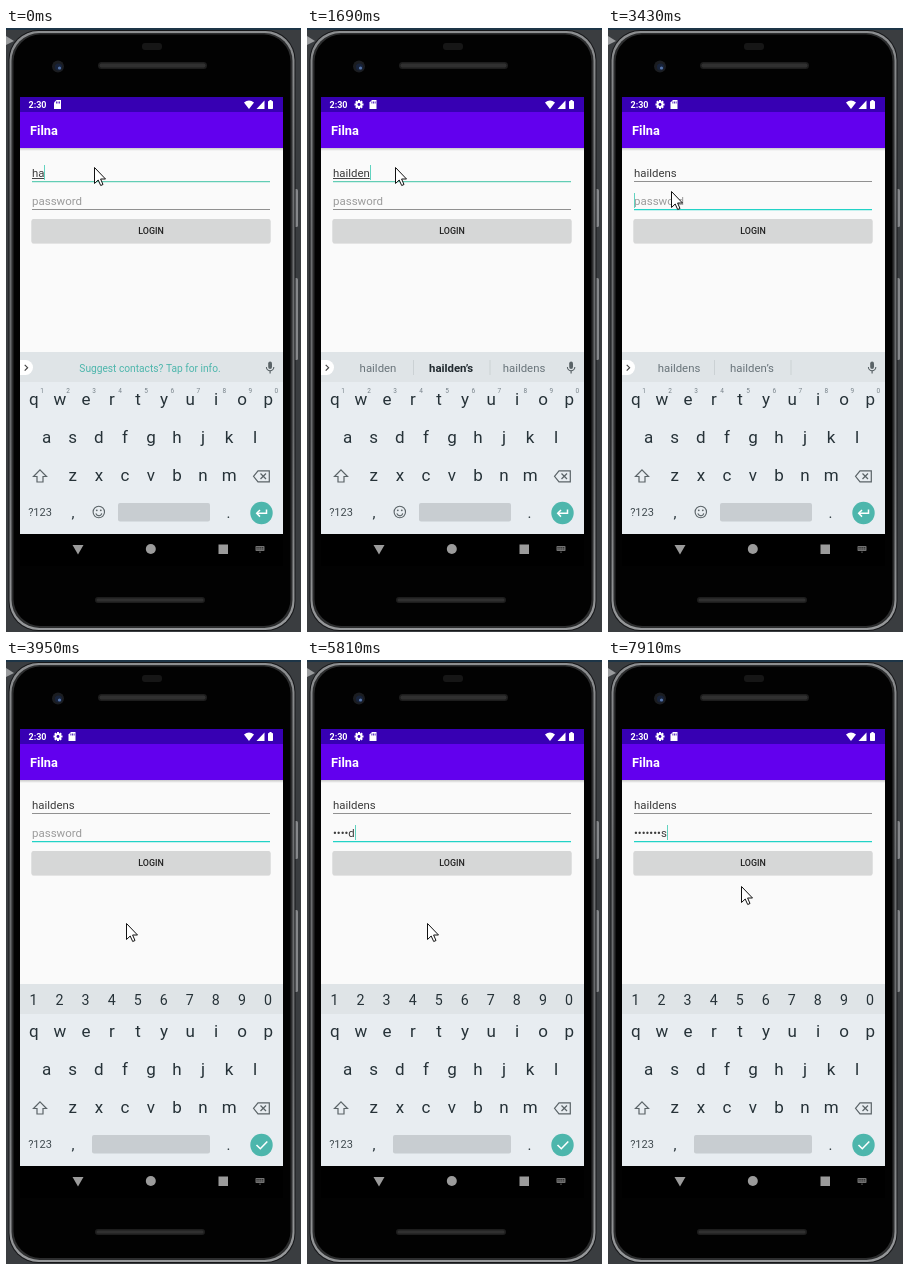
An HTML page with a canvas for the animation above (8 s loop, 295x604 px).

```html
<!DOCTYPE html>
<html lang="en">
<head>
<meta charset="utf-8">
<title>Phone login</title>
<style>
html, body { margin: 0; width: 100%; height: 100%; overflow: hidden; background: #3a3d40; }
canvas { display: block; width: 295px; height: 604px; }
</style>
</head>
<body>
<canvas id="stage"></canvas>
<script>
const W = 295, H = 604, LOOP = 8000;
const canvas = document.getElementById('stage');
const ratio = window.devicePixelRatio || 1;
canvas.width = W * ratio;
canvas.height = H * ratio;
const c = canvas.getContext('2d');
c.scale(ratio, ratio);

const USER = 'haildens', PASS = 'haildens';
const KEY = '#263238', ICON = '#5a6367', TEAL = '#4db6ac';

// Each list holds [start time, value]; a value holds until the next start.
const userLength = [[0, 2], [150, 3], [270, 4], [800, 5], [1180, 6], [1690, 7], [1940, 8]];
const passLength = [[0, 0], [4760, 1], [4910, 2], [5280, 3], [5400, 4], [5810, 5], [6070, 6], [6450, 7], [6970, 8]];
const caretOn = [[0, 1], [2450, 0], [2940, 1], [3810, 0], [4370, 1], [7490, 0], [7910, 1]];
const pointer = [
  [0, [88, 139]], [2570, [77, 150]], [2690, [64, 162]], [2940, [63, 163]],
  [3690, [87, 207]], [3810, [117, 258]], [3950, [120, 263]],
  [7640, [127, 249]], [7790, [131, 234]], [7910, [133, 226]]
];
const hints = [
  [0, null], [270, ['hai', 'hair', 'hail']], [520, ['hail', 'hall', 'halls']],
  [920, ['haild', 'hails', 'halls']], [1430, ['hailde', 'hailden', 'haildens']],
  [1690, ['hailden', 'hailden\u2019s', 'haildens']], [1940, ['haildens', 'hailden\u2019s', '']]
];
const GEAR_AT = 1310, FOCUS_AT = 3310, NUMBERS_AT = 3550;

function at(list, t) {
  let value = list[0][1];
  for (const [start, v] of list) if (t >= start) value = v;
  return value;
}

function rect(x, y, w, h, color) {
  c.fillStyle = color;
  c.fillRect(x, y, w, h);
}

function round(x, y, w, h, r, color) {
  c.fillStyle = color;
  c.beginPath();
  c.roundRect(x, y, w, h, r);
  c.fill();
}

function disc(x, y, r, color) {
  c.fillStyle = color;
  c.beginPath();
  c.arc(x, y, r, 0, Math.PI * 2);
  c.fill();
}

function path(points, closed) {
  c.beginPath();
  points.forEach(([x, y]) => c.lineTo(x, y));
  if (closed) c.closePath();
}

function shape(points, color) {
  path(points, true);
  c.fillStyle = color;
  c.fill();
}

function line(points, color, width, closed) {
  path(points, closed);
  c.strokeStyle = color;
  c.lineWidth = width;
  c.stroke();
}

function text(str, x, y, size, color, align = 'left', weight = 400) {
  c.font = `${weight} ${size}px Roboto, sans-serif`;
  c.textAlign = align;
  c.fillStyle = color;
  c.fillText(str, x, y);
  return c.measureText(str).width;
}

function verticalFade(y1, y2, ...colors) {
  const fade = c.createLinearGradient(0, y1, 0, y2);
  colors.forEach((color, i) => fade.addColorStop(i / (colors.length - 1), color));
  return fade;
}

function drawPhone() {
  rect(0, 0, W, H, '#3a3d40');
  rect(0, 0, W, 2, '#1d3547');
  shape([[0, 8], [8, 13], [0, 17]], '#9a9c9e');
  round(287, 161, 5, 38, 1.5, '#85878a');
  round(287, 250, 5, 82, 1.5, '#85878a');
  round(2.5, 2, 287, 601, 30, '#17181a');
  round(3.5, 3, 285, 599, 29, verticalFade(3, 602, '#8d8f91', '#6b6d6f', '#6b6d6f', '#97999b'));
  round(5.5, 5, 281, 595, 28, '#2c2d2e');
  round(7.5, 6.5, 277, 591.5, 27, '#020202');
  round(136, 15, 20, 7, 3, '#161616');
  drawSpeaker(92, 34, 109, 7);
  drawSpeaker(89, 569, 110, 6);
  disc(52, 38.5, 6, '#1b1d21');
  disc(52.5, 39, 3.6, '#18233a');
  disc(53.5, 40, 1.6, '#5573a8');
}

function drawSpeaker(x, y, w, h) {
  round(x, y, w, h, h / 2, '#1d1d1d');
  round(x + 1.5, y + 1.5, w - 3, h - 3, h / 2 - 1.5, '#303030');
}

function drawCard(x) {
  shape([[x + 2.5, 72], [x + 7, 72], [x + 7, 81], [x, 81], [x, 74.5]], '#fff');
  for (let i = 0; i < 3; i++) rect(x + 2 + i * 1.6, 73.5, 0.8, 2, '#3700b3');
}

function drawGear(x, y) {
  for (let i = 0; i < 8; i++) {
    c.save();
    c.translate(x, y);
    c.rotate(i * Math.PI / 4);
    rect(-1, -4.5, 2, 3, '#fff');
    c.restore();
  }
  disc(x, y, 3.3, '#fff');
  disc(x, y, 1.4, '#3700b3');
}

function drawBars(t) {
  rect(14, 69, 263, 437, '#fafafa');
  rect(14, 69, 263, 15, '#3700b3');
  rect(14, 84, 263, 36, '#6200ee');
  rect(14, 120, 263, 3, verticalFade(120, 123, 'rgba(0,0,0,.2)', 'rgba(0,0,0,0)'));

  text('2:30', 22.5, 80, 9, '#fff', 'left', 700);
  if (t >= GEAR_AT) drawGear(52, 76.5);
  drawCard(t >= GEAR_AT ? 62.5 : 48);
  c.fillStyle = '#fff';
  c.beginPath();
  c.moveTo(243, 81);
  c.arc(243, 81, 8.2, -Math.PI * 0.71, -Math.PI * 0.29);
  c.fill();
  shape([[258.5, 72.5], [258.5, 81], [250.5, 81]], '#fff');
  round(262, 73, 5, 8, 0.7, '#fff');
  rect(263.4, 72, 2.2, 1.5, '#fff');
  text('Filna', 24, 107, 12.8, '#fff', 'left', 700);
}

function drawField(y, focused, accent) {
  rect(26, y, 238, focused ? 1.25 : 0.9, focused ? accent : '#858585');
}

function drawForm(t) {
  const onPass = t >= FOCUS_AT;
  const user = USER.slice(0, at(userLength, t));
  const userWidth = text(user, 26, 148.7, 11.4, '#3c3c3c');
  if (!onPass) rect(26, 150, userWidth, 1, '#444');
  const count = at(passLength, t);
  const pass = count ? '\u2022'.repeat(count - 1) + PASS[count - 1] : '';
  const passWidth = text(pass, 26, 177, 11.4, '#3c3c3c');
  if (!count) text('password', 26, 177, 11.5, '#9b9b9b');

  drawField(153, !onPass, '#62cdb5');
  drawField(181, onPass, '#22d2c6');
  if (at(caretOn, t)) {
    const x = Math.round(26 + (onPass ? passWidth : userWidth));
    rect(x, onPass ? 165 : 137, 1, 15, '#62d3c0');
  }

  round(25.5, 191.5, 239, 24.3, 2, 'rgba(0,0,0,.12)');
  round(25.5, 191, 239, 24, 2, '#d6d7d7');
  text('LOGIN', 145, 206, 8.9, '#222', 'center', 500);
}

function drawSuggestions(t) {
  round(14, 332, 13, 15, [0, 7.5, 7.5, 0], '#fff');
  line([[18.7, 336.8], [21.6, 339.7], [18.7, 342.6]], '#444', 1.2);

  const words = at(hints, t);
  if (words) {
    words.forEach((word, i) => {
      const bold = i === 1 && t < 1940;
      text(word, 71 + i * 73, 343.7, 11.4, bold ? '#222b30' : '#69747a', 'center', bold ? 700 : 400);
    });
    rect(106, 332, 1, 15, '#cbd1d4');
    rect(182.5, 332, 1, 15, '#cbd1d4');
  } else {
    text('Suggest contacts? Tap for info.', 144, 344, 10.2, TEAL, 'center');
  }

  round(262.2, 333.5, 3.8, 7.5, 1.9, ICON);
  c.strokeStyle = ICON;
  c.lineWidth = 1.1;
  c.beginPath();
  c.arc(264.1, 339, 3.7, 0, Math.PI);
  c.stroke();
  rect(263.5, 342.5, 1.2, 3, ICON);
}

function keyRow(keys, x, y, size) {
  [...keys].forEach((key, i) => text(key, x + i * 26.05, y, size, KEY, 'center'));
}

function drawKeyboard(t) {
  const numbers = t >= NUMBERS_AT;
  rect(14, 324, 263, 182, '#e8edf1');
  rect(14, 324, 263, 30, '#dfe4e7');
  if (numbers) {
    keyRow('1234567890', 27.5, 345, 14.2);
  } else {
    drawSuggestions(t);
    [...'1234567890'].forEach((n, i) => text(n, 36 + i * 26.05, 365, 6.5, '#78838a', 'center'));
  }
  keyRow('qwertyuiop', 27.8, 377, 17);
  keyRow('asdfghjkl', 40.7, 415, 17);
  keyRow('zxcvbnm', 66.8, 453, 17);

  line([[34, 441.8], [40.5, 448.5], [37, 448.5], [37, 454], [31, 454], [31, 448.5], [27.5, 448.5]], ICON, 1.2, true);
  line([[247.5, 448.3], [252, 442.8], [263.3, 442.8], [263.3, 453.8], [252, 453.8]], ICON, 1.2, true);
  line([[254.5, 445.5], [260, 451]], ICON, 1.2);
  line([[260, 445.5], [254.5, 451]], ICON, 1.2);

  text('?123', 34, 488, 11, '#414b50', 'center');
  text(',', 67, 489.5, 15, KEY, 'center');
  text('.', 222.5, 489.5, 15, KEY, 'center');
  if (!numbers) drawSmile(92.8, 484);
  const left = numbers ? 86 : 112;
  round(left, 475, 204 - left, 18.5, 2, '#c8cdd1');

  disc(255.5, 485, 11.2, TEAL);
  if (numbers) {
    line([[250.5, 485], [254.3, 488.7], [261.3, 481.5]], '#fff', 1.6);
  } else {
    line([[260.5, 481.5], [260.5, 485.3], [251, 485.3]], '#fff', 1.5);
    line([[254, 482], [250.7, 485.3], [254, 488.6]], '#fff', 1.5);
  }
}

function drawSmile(x, y) {
  c.strokeStyle = ICON;
  c.lineWidth = 1.1;
  c.beginPath();
  c.arc(x, y, 5.7, 0, Math.PI * 2);
  c.stroke();
  c.beginPath();
  c.arc(x, y + 0.7, 3, 0.2, Math.PI - 0.2);
  c.stroke();
  disc(x - 2, y - 1.7, 0.9, ICON);
  disc(x + 2, y - 1.7, 0.9, ICON);
}

function drawNav() {
  const grey = '#9b9b9b', dim = '#727272';
  rect(14, 506, 263, 32, '#000');
  shape([[66.5, 517], [77.5, 517], [72, 526.5]], grey);
  disc(144.8, 521, 5, grey);
  rect(212.5, 516.5, 9.5, 9.5, grey);
  round(249.5, 518, 9, 5, 0.7, dim);
  for (let i = 0; i < 8; i++) rect(250.6 + (i % 4) * 1.9, 519 + (i >> 2) * 1.6, 0.9, 0.8, '#000');
  shape([[252.8, 523.7], [255.2, 523.7], [254, 525]], dim);
}

function drawPointer(t) {
  const [x, y] = at(pointer, t);
  const arrow = [[0, 0], [0, 16], [3.7, 12.5], [6.2, 18], [8.5, 17], [6.1, 11.5], [11, 11.5]];
  c.save();
  c.translate(x + 0.5, y + 0.5);
  shape(arrow, '#fff');
  line(arrow, '#111', 1, true);
  c.restore();
}

const start = performance.now();
function frame() {
  const t = (performance.now() - start) % LOOP;
  drawPhone();
  drawBars(t);
  drawForm(t);
  drawKeyboard(t);
  drawNav();
  drawPointer(t);
  requestAnimationFrame(frame);
}
frame();
</script>
</body>
</html>
```
